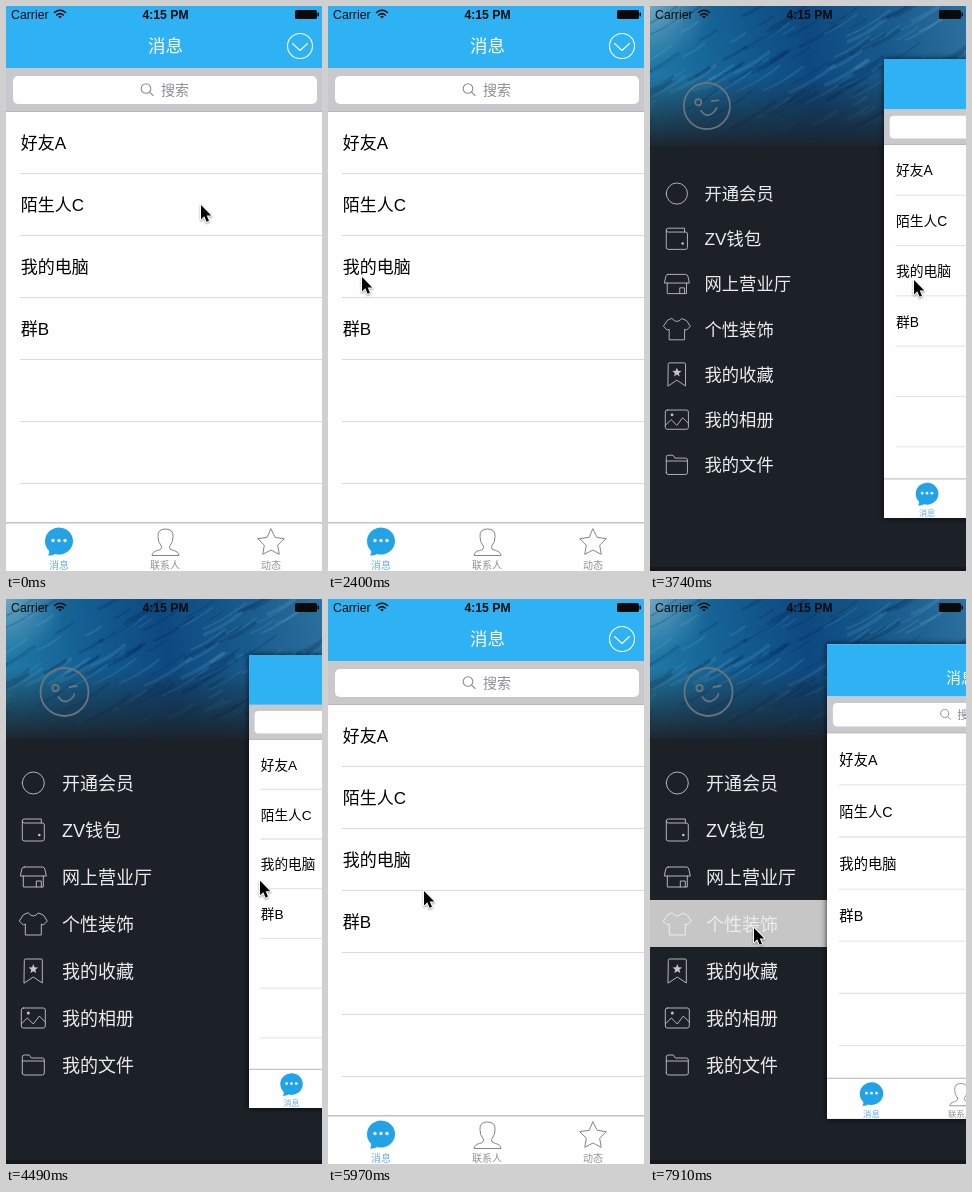
These frames come from a looping animation (316x565 px, 8000 ms). An HTML page with a canvas:

```html
<!DOCTYPE html>
<html lang="zh-CN">
<head>
<meta charset="utf-8">
<title>消息</title>
<style>
html, body { margin: 0; width: 100%; height: 100%; overflow: hidden; background: #1c2027; }
canvas { display: block; width: 316px; height: 565px; }
</style>
</head>
<body>
<canvas id="stage"></canvas>
<script>
const W = 316, H = 565, LOOP = 8000, STEP = 149.1;
const FONT = '"Liberation Sans", "Noto Sans CJK SC", "Noto Sans CJK", sans-serif';
const canvas = document.getElementById('stage');
const dpr = window.devicePixelRatio || 1;
canvas.width = W * dpr;
canvas.height = H * dpr;
const c = canvas.getContext('2d');

// Poses: page left, page scale, menu scale, menu shift
const SHUT = [0, 1, .74, -40], OPEN = [243, .802, 1, 0];
const DRAG = [
  [16, SHUT], [25, [234, .8124, .962, .6]], [28, OPEN],
  [32, OPEN], [35, [165, .862, .915, -16.6]], [39, SHUT],
  [41, SHUT], [45, [114, .925, .851, -20.2]], [47, OPEN],
  [52, OPEN], [53, [177, .84, 1, 0]]
];
const CURSOR = [
  [0, [195, 199]], [4, [285, 47]], [10, [285, 46]], [15, [34, 271]], [16, [34, 271]],
  [25, [264, 274]], [32, [250, 285]], [35, [180, 288]], [40, [96, 292]],
  [45, [211, 297]], [48, [127, 325]], [49, [103, 326]], [52, [104, 329]]
];

const ramp = (n, a, b) => Math.min(1, Math.max(0, (n - a) / (b - a)));

// Value of a track at step n, linear between its keys
function at(track, n) {
  const i = track.findIndex(([step]) => step > n);
  if (i < 0) return track[track.length - 1][1];
  if (i === 0) return track[0][1];
  const [a, from] = track[i - 1], [b, to] = track[i];
  return from.map((v, j) => v + (to[j] - v) * ramp(n, a, b));
}

function star(outer, inner, cy = 0) {
  let d = '';
  for (let i = 0; i < 10; i++) {
    const r = i % 2 ? inner : outer, a = i * Math.PI / 5;
    d += (i ? 'L' : 'M') + r * Math.sin(a) + ' ' + (cy - r * Math.cos(a));
  }
  return d + 'Z';
}
const dot = (x, y, r) => `M${x - r} ${y}a${r} ${r} 0 1 0 ${2 * r} 0a${r} ${r} 0 1 0 ${-2 * r} 0Z`;

// Menu rows: label, outline, solid detail
const MENU = [
  ['开通会员', dot(0, 0, 11), ''],
  ['ZV钱包', 'M8-7V-11H-9q-2 0-2 2V9q0 2 2 2H9q2 0 2-2V-5q0-2-2-2H-9q-2 0-2-2', dot(6, 5, 1.3)],
  ['网上营业厅', 'M-9-10H9q2 0 2.5 2L13-1H-13L-11.5-8Q-11-10-9-10ZM-10-1V10H10V-1M3 10V4H8V10', ''],
  ['个性装饰', 'M-5-11Q0-5 5-11L10-9 14-3 10 1 8 0V11H-8V0L-10 1-14-3-10-9Z', ''],
  ['我的收藏', 'M-9-11q0-1 1-1H8q1 0 1 1V12L0 6-9 12Z', star(5, 2.2, -2)],
  ['我的相册', 'M-10-10H10q2 0 2 2V8q0 2-2 2H-10q-2 0-2-2V-8q0-2 2-2ZM-12 6L-6 0 0 6 6-2 12 4', dot(-5, -5, 1.5)],
  ['我的文件', 'M-11 8V-8q0-2 2-2H-4L-2-7H9q2 0 2 2V8q0 2-2 2H-9q-2 0-2-2ZM-11-4H11', '']
];
const CHATS = ['好友A', '陌生人C', '我的电脑', '群B'];
const PERSON = 'M-4 4Q-8-1-7.5-6Q-8-13.5 0-13.5T7.5-6Q8-1 4 4Q3 7 8 8Q13 9 13.5 13H-13.5Q-13 9-8 8Q-3 7-4 4Z';
const BUBBLE = 'M-14 0A14 13.5 0 1 1-4 13Q-7 15-11 14.5Q-9 12-10 9.5Q-14 6-14 0Z';
const ARROW = 'M0 0V14.5L3.3 11.3 5.6 16.8 8 15.7 5.7 10.4H10.3Z';

function text(s, x, y, size, color, align = 'left', weight = 300) {
  c.font = `${weight} ${size}px ${FONT}`;
  c.textAlign = align;
  c.fillStyle = color;
  c.fillText(s, x, y + size * .37);
}
function box(x, y, w, h, color, r = 0) {
  c.fillStyle = color;
  c.beginPath();
  c.roundRect(x, y, w, h, r);
  c.fill();
}
function shape(d, x, y, stroke, fill, width = 1) {
  c.save();
  c.translate(x, y);
  const p = new Path2D(d);
  c.lineWidth = width;
  c.lineJoin = c.lineCap = 'round';
  if (fill) { c.fillStyle = fill; c.fill(p); }
  if (stroke) { c.strokeStyle = stroke; c.stroke(p); }
  c.restore();
}
function blend(gradient, ...colors) {
  colors.forEach((color, i) => gradient.addColorStop(i / (colors.length - 1), color));
  return gradient;
}

function backdrop() {
  let seed = 7;
  const rnd = () => (seed = seed * 16807 % 2147483647) / 2147483647;
  box(0, 0, W, H, '#1c2027');
  box(0, 0, W, 140, blend(c.createLinearGradient(0, 60, W, 20), '#1f79a6', '#145f93', '#0d4980', '#175a8c', '#2b6f9c'));
  box(0, 0, 150, 60, blend(c.createRadialGradient(0, 0, 0, 0, 0, 60), 'rgba(165,200,215,.6)', 'rgba(120,180,210,0)'));
  // Spray: thin random streaks rising to the right
  for (let i = 0; i < 130; i++) {
    const x = rnd() * W - 20, y = rnd() * 125, len = 12 + rnd() * 35;
    shape(`M0 0q${len / 2} ${-len * .2} ${len} ${-len * .6}`, x, y,
      rnd() < .5 ? 'rgba(110,180,215,.16)' : 'rgba(4,32,66,.2)', null, 1 + rnd() * 3);
  }
  box(0, 70, W, 85, blend(c.createLinearGradient(0, 70, 0, 145), 'rgba(28,32,39,0)', 'rgba(24,36,48,.55)', '#1c2027'));
  box(0, 561, W, 4, '#15181d');
}

function menu(scale, shift, picked) {
  c.save();
  c.translate(shift, 278 * (1 - scale));
  c.scale(scale, scale);
  shape(dot(0, 0, 24) + dot(-9, -4, 3.2) + 'M5-5L12-6M-6 5Q-2 11 3 9T10 2', 58.5, 93, '#6c757b', null, 1.8);
  MENU.forEach(([label, line, solid], i) => {
    const y = 278 + (i - 2) * 47, lit = picked && i === 3;
    if (lit) box(0, y - 24, W, 47, '#c6c6c6');
    shape(line, 27.3, y, lit ? '#eee' : '#b4b6b8');
    shape(solid, 27.3, y, null, '#c4c6c8');
    text(label, 56, y, 18, '#ececec');
  });
  c.restore();
}

function page(left, scale, panel, dim) {
  c.save();
  c.translate(left, H / 2 * (1 - scale));
  c.scale(scale, scale);
  c.shadowColor = 'rgba(0,0,0,.8)';
  c.shadowBlur = 6 * dpr;
  box(0, 0, W, H, '#fefefe');
  c.shadowColor = 'transparent';

  box(0, 62, W, 44, '#c8c8cd');
  box(0, 105, W, 1, '#b5b5ba');
  box(7, 70, 304, 28, '#fefefe', 5);
  shape(dot(0, 0, 4.8) + 'M3.6 3.6L7 7', 140, 82.5, '#8e8e93', null, 1.1);
  text('搜索', 155, 84, 14, '#8e8e93');
  CHATS.forEach((name, i) => text(name, 14.7, 137 + 62 * i, 17, '#000'));
  for (let i = 0; i < 6; i++) box(14, 167 + 62 * i, W - 14, 1, '#dadadc');

  if (dim) box(0, 62, W, 455, `rgba(0,0,0,${dim})`);
  if (panel) box(0, 62, W, panel, '#ededed');

  box(0, 0, W, 62, '#2eb2f4');
  text('消息', 159.5, 40, 17.5, '#fff', 'center', 500);
  shape(dot(0, 0, 12.5), 294, 40, '#fff', null, 1.1);
  shape(dim ? 'M-7.5 3.5L0-4 7.5 3.5' : 'M-7.5-2.5L0 4.5 7.5-2.5', 294, 40, '#fff', null, 1.1);

  box(0, 517, W, 48, '#fefefe');
  box(0, 516, W, 1.5, '#c4c4c6');
  shape(BUBBLE, 53, 535, null, '#22a3e8');
  for (const x of [-6, 0, 6]) shape(dot(x, 0, 1.7), 53, 534.5, null, '#fff');
  shape(PERSON, 159.5, 536.5, '#858585');
  shape(star(14, 7), 265, 537, '#858585');
  ['消息', '联系人', '动态'].forEach((label, i) =>
    text(label, 53 + 106 * i, 559, 10, i ? '#929292' : '#6aaee6', 'center'));
  c.restore();
}

function statusBar() {
  text('Carrier', 5, 8, 12.3, '#0a0a0a');
  shape('M-5.5-1.5Q0-6 5.5-1.5M-3.3 1Q0-1.8 3.3 1', 54, 8, '#0a0a0a', null, 1.6);
  shape('M-1.8 2.5Q0 1.2 1.8 2.5L0 4.5Z', 54, 8, null, '#0a0a0a');
  text('4:15 PM', 159.5, 8, 12.2, '#0a0a0a', 'center', 700);
  box(289, 4, 22, 9, '#0a0a0a', 1.5);
  box(311.5, 6.5, 1.5, 4, '#0a0a0a', .7);
}

function cursor(x, y) {
  c.save();
  c.shadowColor = 'rgba(0,0,0,.4)';
  c.shadowBlur = 2 * dpr;
  c.shadowOffsetY = dpr;
  shape(ARROW, x, y, '#fff', null, 2);
  c.restore();
  shape(ARROW, x, y, null, '#000');
}

const start = performance.now();
function draw(now) {
  // The screen is sampled in even steps
  const n = Math.floor(Math.max(0, now - start) % LOOP / STEP);
  const [left, scale, menuScale, shift] = at(DRAG, n);
  const grow = ramp(n, 4, 7), stay = 1 - ramp(n, 10, 12);
  c.setTransform(dpr, 0, 0, dpr, 0, 0);
  backdrop();
  menu(menuScale, shift, n >= 52);
  page(left, scale, 80 * grow ** 2.5 * stay, grow && .5 * stay);
  statusBar();
  cursor(...at(CURSOR, n));
  requestAnimationFrame(draw);
}
draw(start);
</script>
</body>
</html>
```
